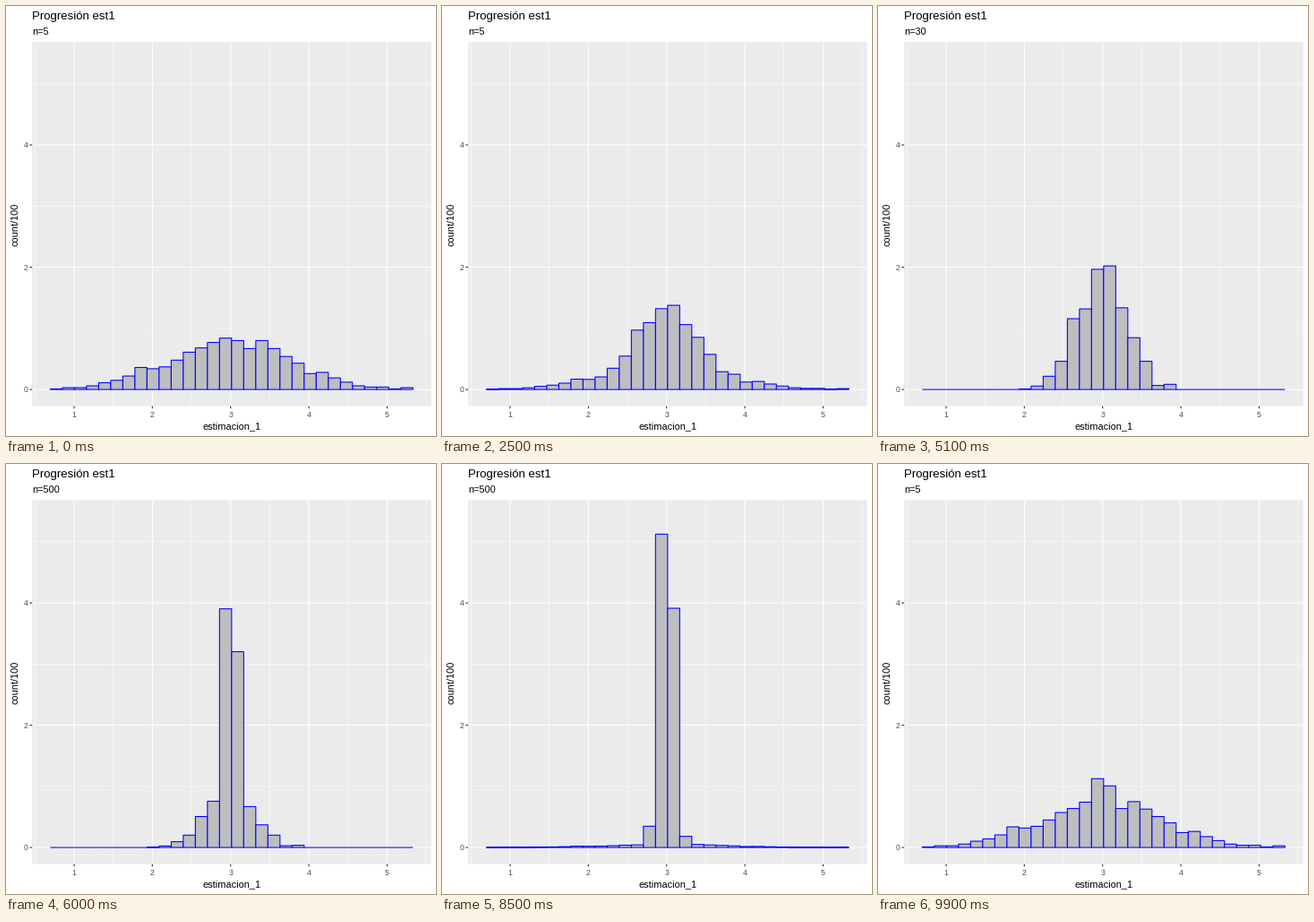
A matplotlib script for the animation above (10 s loop, 480 by 480 pixels).

```python
import matplotlib.pyplot as plt
import numpy as np
from matplotlib.animation import FuncAnimation
from matplotlib.patches import Rectangle

plt.rcParams["font.family"] = "Liberation Sans"

SIZE, DPI = 480, 72
FRAMES, INTERVAL = 100, 100
LINE = 1.067

# Panel box in pixels, y pointing down
LEFT, RIGHT, TOP, BOTTOM = 29.2, 474.52, 40.3, 446.55
BINS = 30
BIN_W = (RIGHT - LEFT) / 1.1 / BINS
BIN_X0 = LEFT + (RIGHT - LEFT) * 0.05 / 1.1
UNIT_X, UNIT_Y = 87.35, 68.26
BASE = BOTTOM - (BOTTOM - TOP) * 0.05 / 1.1


def px(x):
    return 250.7 + (x - 3) * UNIT_X


def py(y):
    return BASE - y * UNIT_Y


def counts(first, values):
    """Histogram heights (count / 100), zero outside the given run of bins."""
    h = np.zeros(BINS)
    h[first:first + len(values)] = values
    return h / 100


STATES = [
    (5, counts(0, [1, 3, 3, 6, 11, 15, 22, 36, 34, 37, 48, 61, 68, 77, 84,
                   80, 67, 80, 67, 54, 43, 26, 28, 19, 12, 6, 4, 4, 1, 3])),
    (30, counts(8, [1, 6, 23, 49, 123, 138, 175, 189, 141, 90, 49, 7, 9])),
    (500, counts(13, [32, 541, 412, 15])),
]
# Last still frame and length of the tween out of each state
TWEENS = [(16, 17), (50, 17), (84, 16)]

fig = plt.figure(figsize=(SIZE / DPI, SIZE / DPI), dpi=DPI, facecolor="white")
ax = fig.add_axes([0, 0, 1, 1])
ax.set_xlim(0, SIZE)
ax.set_ylim(SIZE, 0)
ax.axis("off")


def segment(x, y, color, width, z):
    ax.plot(x, y, color=color, lw=width, zorder=z, snap=False,
            solid_capstyle="butt")


def label(x, y, text, size, color="black", ha="left", rotation=0):
    return ax.text(x, y, text, fontsize=size, color=color, ha=ha,
                   va="baseline", rotation=rotation, rotation_mode="anchor")


ax.add_patch(Rectangle((LEFT, TOP), RIGHT - LEFT, BOTTOM - TOP, fc="#EBEBEB",
                       lw=0, zorder=0, snap=False))

for x in np.arange(0.5, 5.6, 0.5):
    major = x == int(x)
    segment([px(x)] * 2, [TOP, BOTTOM], "white", LINE if major else LINE / 2,
            2 if major else 1)
    if major:
        segment([px(x)] * 2, [BOTTOM, BOTTOM + 2.74], "#333333", LINE, 5)
        label(px(x), 459.2, f"{x:.0f}", 8.8, "#4D4D4D", "center")

for y in range(6):
    major = y % 2 == 0
    segment([LEFT, RIGHT], [py(y)] * 2, "white", LINE if major else LINE / 2,
            2 if major else 1)
    if major:
        segment([LEFT - 2.74, LEFT], [py(y)] * 2, "#333333", LINE, 5)
        label(LEFT - 4.93, py(y) + 3.2, str(y), 8.8, "#4D4D4D", "right")

label(LEFT, 15, "Progresión est1", 13.2)
subtitle = label(LEFT, 32, "", 11)
label((LEFT + RIGHT) / 2, 472, "estimacion_1", 11, ha="center")
label(13.2, (TOP + BOTTOM) / 2, "count/100", 11, ha="center", rotation=90)

bars = [ax.add_patch(Rectangle((BIN_X0 + i * BIN_W, BASE), BIN_W, 0,
                               fc="#BEBEBE", ec="#0000FF", lw=LINE,
                               joinstyle="miter", zorder=4, snap=False))
        for i in range(BINS)]


def pose(frame):
    """Heights and sample size shown at a frame."""
    n, heights = STATES[0]
    for k, (start, length) in enumerate(TWEENS):
        if frame <= start:
            break
        t = min((frame - start) / length, 1)
        (n0, h0), (n1, h1) = STATES[k], STATES[(k + 1) % len(STATES)]
        heights = h0 + (h1 - h0) * t
        n = n1 if frame - start > (length + 1) // 2 else n0
    return n, heights


def update(frame):
    n, heights = pose(frame)
    subtitle.set_text(f"n={n}")
    for bar, h in zip(bars, heights):
        bar.set_height(-h * UNIT_Y)
    return [subtitle, *bars]


anim = FuncAnimation(fig, update, frames=FRAMES, interval=INTERVAL,
                     repeat=True, repeat_delay=0, blit=False)
plt.show()
```
